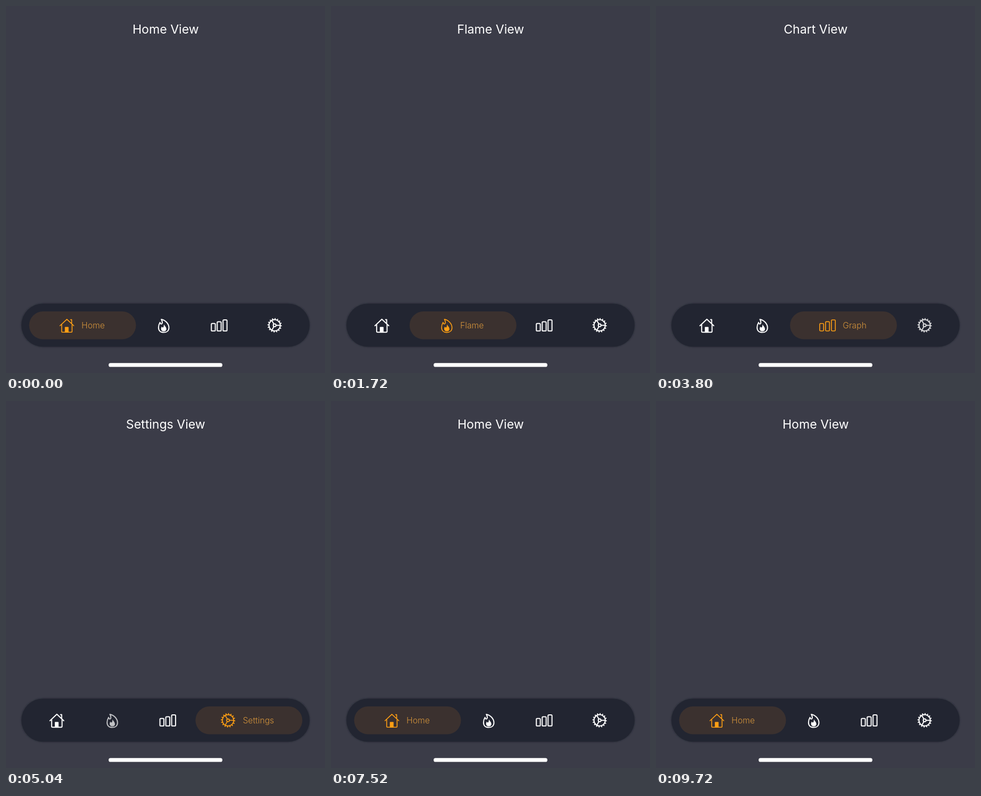
Animation, 600 px wide and 691 px high, one loop 9.8 s. Source, as an HTML page:

```html
<!DOCTYPE html>
<html lang="en">
<head>
<meta charset="utf-8">
<title>Tab bar</title>
<style>
  html, body { margin: 0; width: 100%; height: 100%; overflow: hidden; background: #3b3c48; }
  svg { display: block; width: 100%; height: 100%; }
  text { font-family: Inter, Roboto, "Liberation Sans", sans-serif; }
  .title { font-size: 23.1px; fill: #fff; text-anchor: middle; }
  .label { font-size: 15.7px; font-weight: 300; fill: #d3933b; }
  .icon { stroke-linecap: round; stroke-linejoin: round; fill: none; }
  .solid { fill: currentColor; stroke: none; }
  .icon > * { stroke: currentColor; }
  .icon > .solid { stroke: none; }
</style>
</head>
<body>
<svg id="stage" viewBox="0 0 600 691">
  <defs>
    <filter id="soft" x="-5%" y="-20%" width="110%" height="140%"><feGaussianBlur stdDeviation="1.2"/></filter>
  </defs>
  <rect width="600" height="691" fill="#3b3c48"/>
  <rect x="28" y="559.5" width="544" height="83" rx="41.5" fill="#2b2e39" filter="url(#soft)"/>
  <rect x="29" y="560.5" width="542" height="81" rx="40.5" fill="#222531"/>
  <g id="tabs"></g>
  <rect x="193" y="672.3" width="214" height="7.2" rx="3.6" fill="#fff"/>
</svg>
<script>
const LOOP = 9800, FADE = 350;
const LEFT = 43.5, WIDE = 201, NARROW = 104.3;

const HOUSE = `
  <path d="M-13 0.8 L0 -11.4 L13 0.8 M7 -10.6 H9 V-3.6 M-9.8 -1.6 V11.3 Q-9.8 13 -8 13 H8 Q9.8 13 9.8 11.3 V-1.6"/>
  <path class="solid" d="M-3.8 13.5 V4 Q-3.8 3 -2.8 3 H2.2 Q3.2 3 3.2 4 V13.5Z"/>`;

const FLAME = `
  <path d="M-4.5 -11.3 C3 -10 9.8 -3 9.8 4.5 C9.8 10 6 13.4 0 13.4 C-6 13.4 -9.8 10 -9.8 4
    C-9.8 0 -8.5 -3 -7 -5.5 C-6.5 -3.5 -5.5 -2.5 -4.5 -2.5 C-2.2 -2.8 -2 -7 -4.5 -11.3Z"/>
  <path class="solid" d="M0.5 -1.8 C1.5 1 5 3 5 7 C5 10 2.5 11.2 0 11.2 C-3 11.2 -5 9.5 -5 6.5
    C-5 5 -4.3 3.5 -3.5 2.5 C-3 4 -1.5 4.5 -0.7 3.5 C0.3 2 0 0 0.5 -1.8Z"/>`;

const BARS = [[-11, -3.4], [0, -6.8], [11, -10.2]].map(([x, y]) =>
  `<rect x="${x - 3.7}" y="${y}" width="7.4" height="${10.6 - y}" rx="1.6"/>`).join("");

const GEAR = `
  <circle r="10.6"/><circle r="2.6"/>
  <circle r="12.2" pathLength="32" stroke-dasharray="0.8 1.2" stroke-linecap="butt" stroke-width="2.6"/>` +
  [0, 120, 240].map(a => `<path d="M2.6 0 H10.6" transform="rotate(${a})"/>`).join("");

// iconX and textX are measured from the left edge of the open cell
const TABS = [
  { title: "Home View", label: "Home", art: HOUSE, iconX: 71, textX: 98.6 },
  { title: "Flame View", label: "Flame", art: FLAME, iconX: 70, textX: 95.2 },
  { title: "Chart View", label: "Graph", art: BARS, iconX: 70.5, textX: 99.2 },
  { title: "Settings View", label: "Settings", art: GEAR, iconX: 61.2, textX: 89 }
];

// [press, release, tab]
const TAPS = [
  [1360, 1360, 1], [2800, 3040, 2], [3800, 4120, 3], [4840, 5080, 1],
  [6480, 6720, 0], [7720, 7720, 2], [8480, 8800, 0]
];

const host = document.getElementById("tabs");

function add(name, attrs, content = "") {
  const el = document.createElementNS("http://www.w3.org/2000/svg", name);
  for (const key in attrs) el.setAttribute(key, attrs[key]);
  el.innerHTML = content;
  host.append(el);
  return el;
}

for (const tab of TABS) {
  tab.head = add("text", { class: "title", x: 300.3, y: 51.8 }, tab.title);
  tab.pill = add("rect", { y: 575, height: 52.6, rx: 26.3, fill: "#3b312f" });
  tab.icon = add("g", { class: "icon" }, tab.art);
  tab.text = add("text", { class: "label", y: 606.8 }, tab.label);
}

const clamp = v => Math.min(1, Math.max(0, v));
const mix = (a, b, p) => a + (b - a) * p;
const ease = p => p * p * (3 - 2 * p);

function pose(t) {
  const open = [1, 0, 0, 0], dim = [1, 1, 1, 1];
  for (const [press, release, target] of TAPS) {
    if (t < press) break;
    const p = ease(clamp((t - release) / FADE));
    const held = mix(0.82, 0.72, clamp((t - press) / 120));
    dim.fill(1);
    if (release > press) dim[target] = mix(held, 1, p);
    open.forEach((v, i) => open[i] = mix(v, i === target ? 1 : 0, p));
  }
  return { open, dim };
}

function draw(t) {
  const { open, dim } = pose(t);
  let x = LEFT;
  TABS.forEach((tab, i) => {
    const p = open[i], width = mix(NARROW, WIDE, p);
    tab.head.setAttribute("opacity", p);
    tab.pill.setAttribute("x", x);
    tab.pill.setAttribute("width", width);
    tab.pill.setAttribute("opacity", p);
    const iconX = x + mix(NARROW / 2, tab.iconX, p);
    tab.icon.setAttribute("transform", `translate(${iconX} 601.2)`);
    tab.icon.setAttribute("stroke-width", mix(2, 1.6, p));
    tab.icon.setAttribute("opacity", dim[i]);
    tab.icon.style.color = `rgb(255 ${mix(255, 159, p)} ${mix(255, 20, p)})`;
    tab.text.setAttribute("x", x + mix(tab.textX - 18, tab.textX, p));
    tab.text.setAttribute("opacity", p);
    x += width;
  });
}

const start = performance.now();
function tick() {
  draw((performance.now() - start) % LOOP);
  requestAnimationFrame(tick);
}
tick();
</script>
</body>
</html>
```
